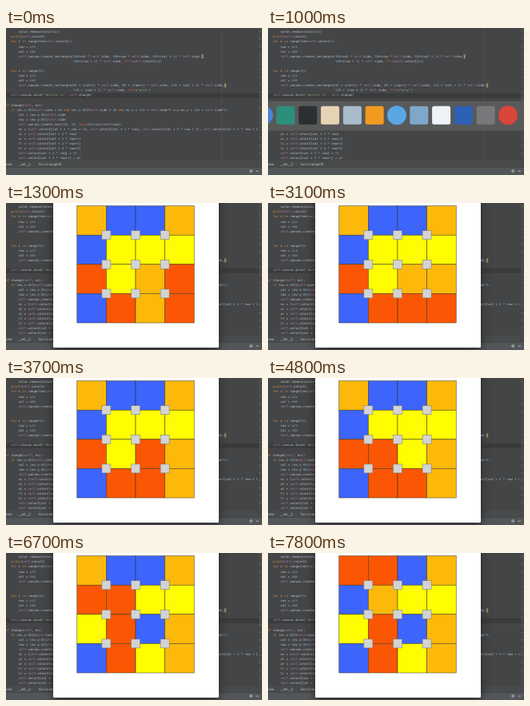
Write an HTML page that moves like this. It is 320 px wide and 184 px high and loops after 8 s.

```html
<!DOCTYPE html>
<html lang="en">
<head>
<meta charset="utf-8">
<title>Rotation puzzle</title>
<style>
html, body { margin: 0; width: 100%; height: 100%; overflow: hidden; background: #444546; }
svg { display: block; width: 100vw; height: 100vh; }
text { white-space: pre; text-rendering: geometricPrecision; }
.code { font: 3.92px "DejaVu Sans Mono", monospace; fill: #c0c8d0; }
.crumb { font: 4.2px Roboto, sans-serif; fill: #c3c5c7; }
.key { fill: #d58a4a; }
.self { fill: #b07fac; }
.num { fill: #7fabcb; }
.str { fill: #8fab7b; }
.arg { fill: #c56a48; }
#win { filter: drop-shadow(0 4px 6px rgba(0, 0, 0, .5)); }
</style>
</head>
<body>
<svg id="stage" viewBox="0 0 320 184"></svg>
<script>
const LOOP = 8000;
const WINDOW_AT = 1100;
const CHAR = 2.36, LINE = 6.08;
const GRID = { x: 88.8, y: 3.6, cell: 36.6 };
const COLORS = { O: '#fdb90a', B: '#3d64fb', Y: '#fffd00', R: '#fb5604' };
const START = 'OBBOBYYYRYORBROR';

// Time, column and row of the 2x2 block turned clockwise
const TURNS = [
  [2000, 2, 2], [3200, 2, 2], [4100, 1, 2], [5200, 0, 1],
  [5700, 0, 1], [6200, 1, 2], [7200, 0, 0], [7600, 0, 0]
];

// Indent in characters, then the line of code
const CODE = [
  [12, 'color.remove(color[i])'],
  [8, 'print(self.color2)'],
  [8, 'for i in range(len(self.color2)):'],
  [12, 'row = i/4'],
  [12, 'col = i%4'],
  [12, 'self.canvas.create_rectangle(100+col * self.side, 100+row * self.side, 100+(col + 1) * self.side,\\'],
  [41, '100+(row + 1) * self.side, fill=self.color2[i])'],
  [0, ''],
  [8, 'for i in range(9):'],
  [12, 'row = i/3'],
  [12, 'col = i%3'],
  [12, 'self.canvas.create_rectangle(80 + (col+1) * self.side, 80 + (row+1) * self.side, 120 + (col + 1) * self.side,\\'],
  [41, '120 + (row + 1) * self.side, fill="grey")'],
  [8, 'self.canvas.bind("<Button-1>", self.change)'],
  [0, ''],
  [4, 'def change(self, ev):'],
  [8, 'if (ev.x-80)%self.side < 40 and (ev.y-80)%self.side < 40 and ev.x < 120 + self.side*3 and ev.y < 120 + self.side*3:'],
  [12, 'col = (ev.x-80)/self.side'],
  [12, 'row = (ev.y-80)/self.side'],
  [12, 'self.canvas.create_text(20, 20, text=str(col)+str(row))'],
  [12, 'nc = [self.color2[col + 4 * row + 4], self.color2[col + 4 * row], self.color2[col + 4 * row + 5], self.color2[col + 4 * row + 1]]'],
  [12, 'ul = self.color2[col + 4 * row]'],
  [12, 'ur = self.color2[col + 4 * row+1]'],
  [12, 'll = self.color2[col + 4 * row+4]'],
  [12, 'lr = self.color2[col + 4 * row+5]'],
  [12, 'self.color2[col + 4 * row] = ll'],
  [12, 'self.color2[col + 4 * row+1] = ul']
];

// Shape and colour of each icon in the app switcher
const ICONS = [
  ['circle', '#4a83dc'], ['square', '#2b8f7c'], ['square', '#2c2f31'], ['square', '#e6d3b4'],
  ['square', '#a9bccb'], ['square', '#f29a20'], ['circle', '#5aa6e2'], ['square', '#7ea7c9'],
  ['square', '#eef1f6'], ['square', '#2c61b5'], ['square', '#77797b'], ['circle', '#d8463c']
];

const stage = document.getElementById('stage');

function add(parent, tag, attrs, content) {
  const node = document.createElementNS('http://www.w3.org/2000/svg', tag);
  for (const name in attrs) node.setAttribute(name, attrs[name]);
  if (content) node.textContent = content;
  parent.append(node);
  return node;
}

function rect(parent, x, y, width, height, fill, more) {
  return add(parent, 'rect', { x, y, width, height, fill, ...more });
}

function kind(token) {
  if (/^(for|in|if|and|def|print)$/.test(token)) return 'key';
  if (token === 'self') return 'self';
  if (/^(fill|text)$/.test(token)) return 'arg';
  if (/^\d/.test(token)) return 'num';
  return token[0] === '"' ? 'str' : '';
}

function drawCode() {
  const code = add(stage, 'g', { class: 'code' });
  CODE.forEach(([indent, line], i) => {
    const x = 6.2 + (indent - 8) * CHAR, y = 6.3 + i * LINE;
    if (line.endsWith('\\')) {
      rect(code, x + (line.length - 1) * CHAR, y - 4, CHAR, 5.4, '#85805a');
    }
    const text = add(code, 'text', { x, y });
    for (const token of line.match(/"[^"]*"|\w+|\W/g) || []) {
      add(text, 'tspan', { class: kind(token) }, token);
    }
  });
}

function drawEditor() {
  rect(stage, 0, 0, 320, 184, '#444546');
  rect(stage, 0, 81.8, 316, 6.1, '#3a3b3c');
  rect(stage, 269.2, 0, .6, 166, '#545556');
  drawCode();
  rect(stage, 316, 0, 4, 166, '#484949');
  for (let y = 4; y < 162; y += 9.5) rect(stage, 316.7, y, 2, .7, '#857e62');
  rect(stage, 0, 166, 320, 8.5, '#484a4b');
  [[-3.5, 'Game'], [15, '__init__()'], [41, 'for i in range(9)']]
    .forEach(([x, label]) => add(stage, 'text', { class: 'crumb', x, y: 171.7 }, label));
  rect(stage, 0, 174.5, 320, 9.5, '#535658');
  rect(stage, 0, 174.2, 320, .5, '#3c3e3f');
  add(stage, 'circle', { cx: 306.3, cy: 179, r: 1.4, fill: 'none', stroke: '#c2c5c7', 'stroke-width': 1 });
  rect(stage, 312.5, 178.7, 3.5, .8, '#c2c5c7');
}

function drawWindow() {
  const win = add(stage, 'g', { id: 'win' });
  rect(win, 59, -12, 207, 193, '#fff', { rx: 1.5 });
  const { x, y, cell } = GRID;
  const line = { stroke: '#33331f', 'stroke-width': .5 };
  const tiles = [...START].map((c, i) =>
    rect(win, x + i % 4 * cell, y + (i >> 2) * cell, cell, cell, COLORS[c], line));
  for (let i = 0; i < 9; i++) {
    const cx = x + (i % 3 + 1) * cell, cy = y + (Math.floor(i / 3) + 1) * cell;
    rect(win, cx - 5.5, cy - 5.5, 11, 11, '#d3d3d3', { stroke: '#76766c', 'stroke-width': .5 });
  }
  return { win, tiles };
}

function drawSwitcher() {
  const panel = add(stage, 'g', {});
  rect(panel, 0, 91.5, 320, 37, '#585959');
  ICONS.forEach(([shape, fill], i) => {
    const cx = -5.8 + i * 27.8, cy = 109.3;
    if (shape === 'circle') add(panel, 'circle', { cx, cy, r: 12, fill });
    else rect(panel, cx - 11.5, cy - 11.5, 23, 23, fill, { rx: 2.5 });
  });
  return panel;
}

function gridAt(t) {
  const grid = [...START];
  for (const [at, col, row] of TURNS) {
    if (t < at) break;
    const a = row * 4 + col, b = a + 1, c = a + 4, d = a + 5;
    [grid[a], grid[b], grid[c], grid[d]] = [grid[c], grid[a], grid[d], grid[b]];
  }
  return grid;
}

drawEditor();
const { win, tiles } = drawWindow();
const switcher = drawSwitcher();

function render(t) {
  win.style.display = t >= WINDOW_AT ? '' : 'none';
  const fade = Math.min((t - 50) / 100, (WINDOW_AT + 180 - t) / 180, 1);
  switcher.style.opacity = t < 100 ? 0 : Math.max(0, fade);
  gridAt(t).forEach((c, i) => tiles[i].setAttribute('fill', COLORS[c]));
}

const begin = performance.now();
function tick() {
  render((performance.now() - begin) % LOOP);
  requestAnimationFrame(tick);
}
tick();
</script>
</body>
</html>
```
